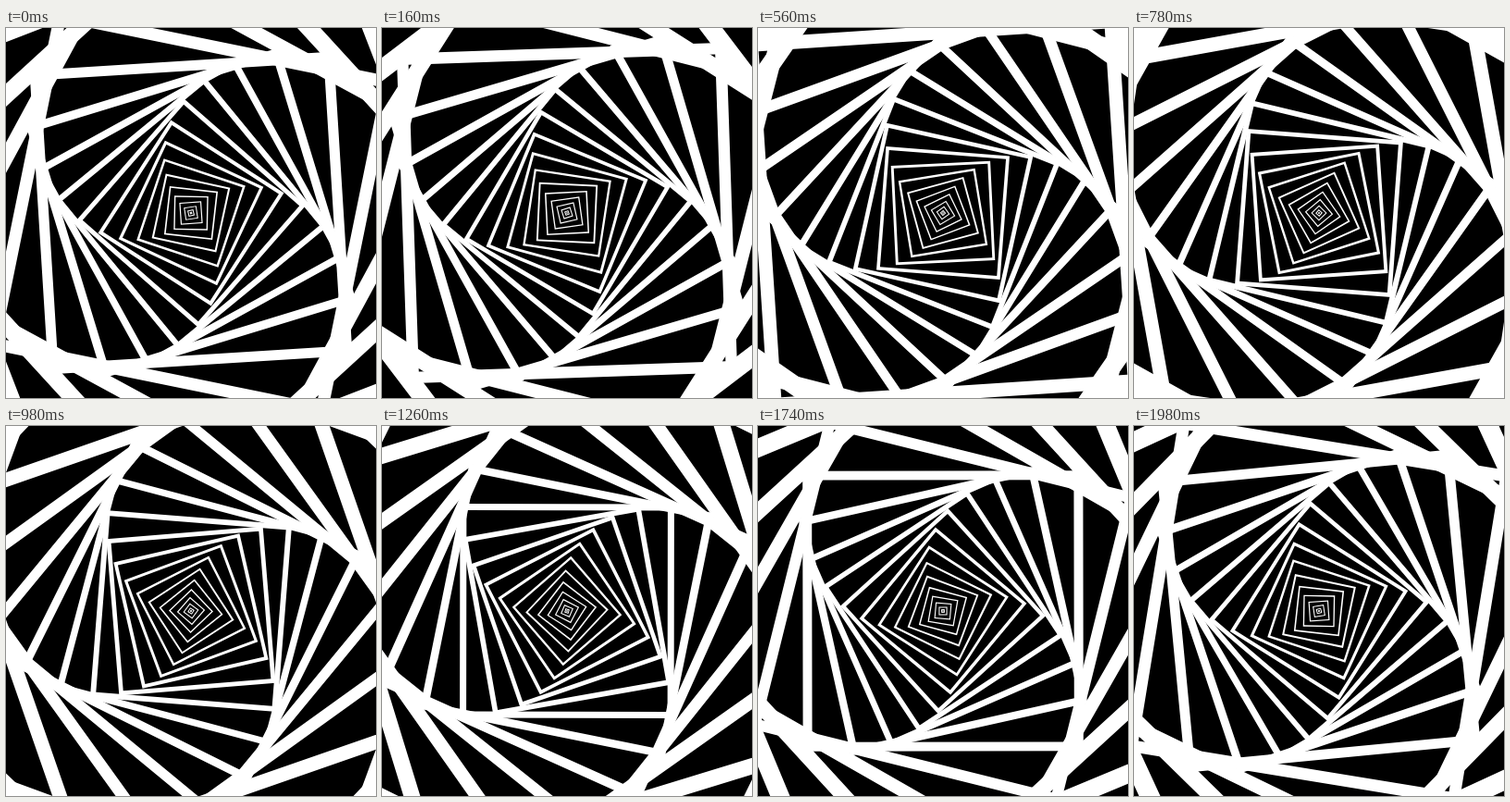
Recreate the animation shown at these times as an HTML page without scripts. Size 400x400 px, loop 2000 ms.

```html
<!DOCTYPE html>
<html lang="en">
<head>
<meta charset="utf-8">
<title>Square spiral</title>
<style>
  @property --p {
    syntax: "<number>";
    inherits: false;
    initial-value: 0;
  }

  html, body {
    margin: 0;
    width: 100%;
    height: 100%;
    overflow: hidden;
    background: #000;
  }

  svg {
    display: block;
    width: 100vw;
    height: 100vh;
  }

  /* --p is the age of a square: size grows with its square, line weight with its cube */
  rect {
    --area: calc(var(--p) * var(--p));
    --cube: calc(var(--area) * var(--p));
    --half: calc(282.84px * var(--area));
    --twist: calc(var(--cube) * (46deg + 69deg * var(--p)));
    x: calc(-1 * var(--half));
    y: calc(-1 * var(--half));
    width: calc(2 * var(--half));
    height: calc(2 * var(--half));
    fill: none;
    stroke: #fff;
    stroke-width: calc(1px + 24px * var(--cube));
    transform: rotate(calc(4.5deg * var(--i) - 22.3deg + var(--twist)));
    animation: grow 2s steps(100) infinite;
    animation-delay: calc(-100ms * var(--i) - 1ms);
  }

  @keyframes grow {
    from { --p: 0; }
    to { --p: 1; }
  }
</style>
</head>
<body>
<svg viewBox="-200 -200 400 400">
  <rect style="--i:0"/>
  <rect style="--i:1"/>
  <rect style="--i:2"/>
  <rect style="--i:3"/>
  <rect style="--i:4"/>
  <rect style="--i:5"/>
  <rect style="--i:6"/>
  <rect style="--i:7"/>
  <rect style="--i:8"/>
  <rect style="--i:9"/>
  <rect style="--i:10"/>
  <rect style="--i:11"/>
  <rect style="--i:12"/>
  <rect style="--i:13"/>
  <rect style="--i:14"/>
  <rect style="--i:15"/>
  <rect style="--i:16"/>
  <rect style="--i:17"/>
  <rect style="--i:18"/>
  <rect style="--i:19"/>
</svg>
</body>
</html>
```
